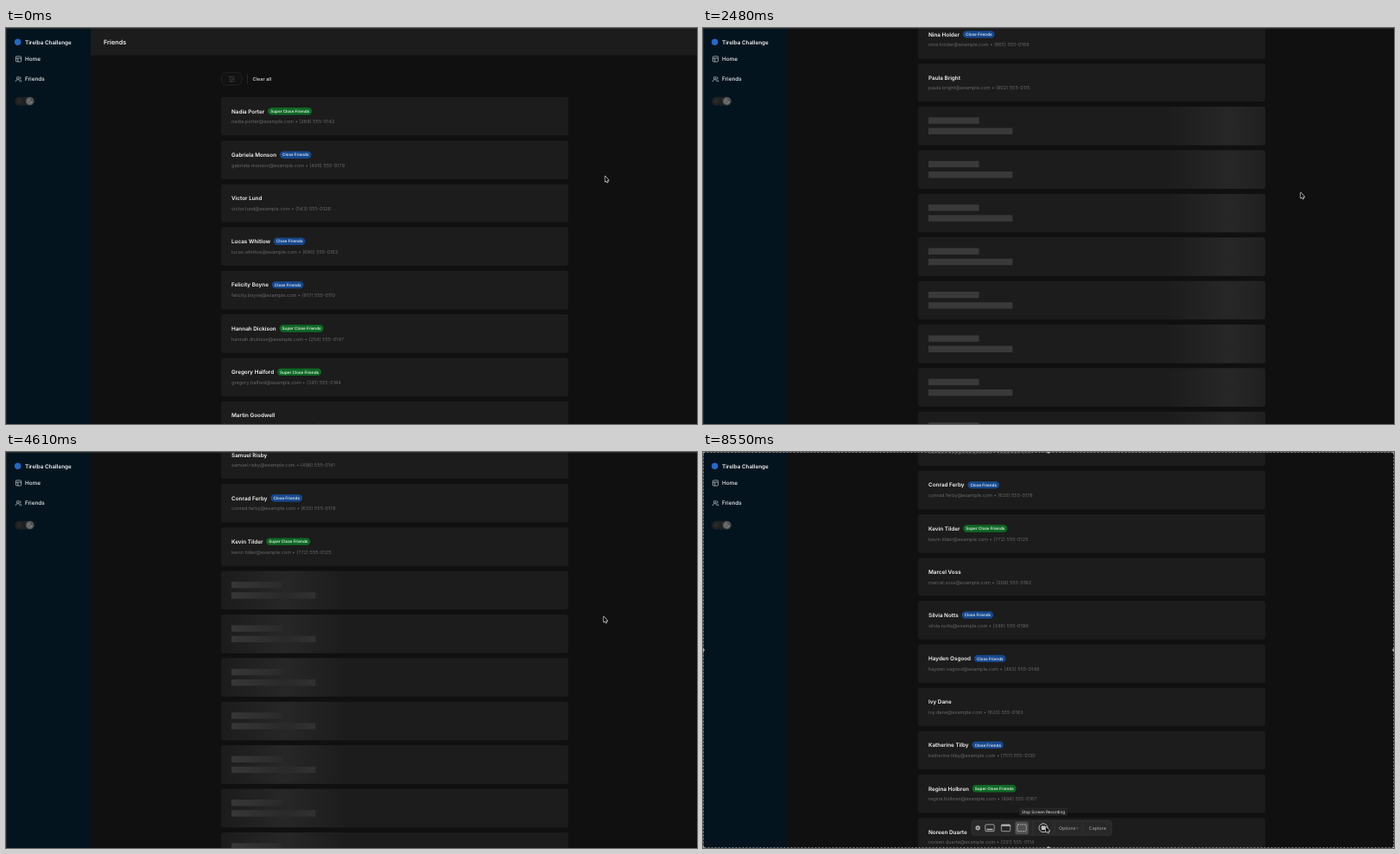
An HTML page with a canvas that plays this animation: 800x458 px, repeating every 8.58 s.

```html
<!DOCTYPE html>
<html lang="en">
<head>
<meta charset="utf-8">
<title>Friends</title>
<style>
  html, body { margin: 0; width: 100%; height: 100%; overflow: hidden; background: #101010; }
  canvas { display: block; width: 800px; height: 458px; }
</style>
</head>
<body>
<canvas id="stage"></canvas>
<script>
const W = 800, H = 458, LOOP = 8580;
const canvas = document.getElementById('stage');
const ctx = canvas.getContext('2d');
const ratio = window.devicePixelRatio || 1;
canvas.width = W * ratio;
canvas.height = H * ratio;

const CARD = { x: 249, w: 402, pad: 12, gap: 6, badged: 44.4, plain: 43.6 };
const LIST_TOP = 80;
const PAGE_LOADS = [0, 2850, 4950];
const SHIMMER_STARTS = [1080, 3925];
const TOOLBAR_IN = 6800, TOOLTIP_IN = 8340;
const BADGES = {
  s: { label: 'Super Close Friends', width: 51, fill: '#0f6825', ink: '#dcefdf' },
  c: { label: 'Close Friends', width: 36.6, fill: '#17488b', ink: '#d9e5f6' },
};

// One list per loaded page; the optional prefix is the badge kind.
const pages = [
  ['s:Nadia Porter', 'c:Gabriela Monson', 'Victor Lund', 'c:Lucas Whitlow', 'c:Felicity Boyne',
   's:Hannah Dickison', 's:Gregory Halford', 'Martin Goodwell', 'c:Nina Holder', 'Paula Bright'],
  ['c:Judith Norwood', 'Owen Tully', 's:Miriam Castle', 'c:Melanie Hampston', 'Colin Mercado',
   's:Curtis Haldren', 'c:Neil Tarvey', 'Samuel Risby', 'c:Conrad Ferby', 's:Kevin Tilder'],
  ['Marcel Voss', 'c:Silvia Notts', 'c:Hayden Osgood', 'Ivy Dane', 'c:Katherine Tilby',
   's:Regina Holbren', 'Noreen Duarte'],
];

// Layout: every friend gets a page position, every page a bottom edge.
const friends = [], pageEnds = [];
let nextTop = LIST_TOP;
pages.forEach((page, pageIndex) => {
  for (const entry of page) {
    const [name, kind] = entry.split(':').reverse();
    const i = friends.length;
    const height = kind ? CARD.badged : CARD.plain;
    const area = 200 + (i * 137 + 69) % 700;
    const line = 10 + (i * 37 + 32) % 90;
    const email = name.toLowerCase().replace(' ', '.') + '@example.com';
    friends.push({ name, badge: BADGES[kind], height, top: nextTop, page: pageIndex,
                   contact: `${email} • (${area}) 555-01${line}` });
    nextTop += height + CARD.gap;
  }
  pageEnds.push(nextTop);
});

// Keys are [time, value, slope].
const scrollKeys = [
  [900, 0, 0], [1420, 227.7, .4], [2480, 490.5, .01], [2850, 492, 0],
  [3420, 492, 0], [4060, 734.8, .45], [4610, 945.4, .08], [5100, 960.6, 0],
];

function hermite(keys, t) {
  if (t <= keys[0][0]) return keys[0][1];
  const next = keys.findIndex(k => k[0] > t);
  if (next < 0) return keys[keys.length - 1][1];
  const [t0, a, va] = keys[next - 1], [t1, b, vb] = keys[next];
  const d = t1 - t0, u = (t - t0) / d, u2 = u * u, u3 = u2 * u;
  return a * (2 * u3 - 3 * u2 + 1) + va * d * (u3 - 2 * u2 + u)
       + b * (3 * u2 - 2 * u3) + vb * d * (u3 - u2);
}

function ease(t, from, to) {
  const u = Math.min(1, Math.max(0, (t - from) / (to - from)));
  return u * u * (3 - 2 * u);
}

function cursorAt(t) {
  const settle = ease(t, 150, 850), reach = ease(t, 7390, 8330);
  const x = 693.5 - 1.5 * settle, y = 171.5 + 19 * settle;
  return [x + (397 - x) * reach, y + (433.5 - y) * reach];
}

function box(x, y, w, h, r, fill, stroke, lineWidth = .6) {
  ctx.beginPath();
  ctx.roundRect(x, y, w, h, r);
  if (fill) { ctx.fillStyle = fill; ctx.fill(); }
  if (stroke) { ctx.strokeStyle = stroke; ctx.lineWidth = lineWidth; ctx.stroke(); }
}

function disc(x, y, r, fill, stroke, lineWidth = .7) {
  box(x - r, y - r, 2 * r, 2 * r, r, fill, stroke, lineWidth);
}

function stroke(path, color, lineWidth = .7) {
  ctx.strokeStyle = color;
  ctx.lineWidth = lineWidth;
  ctx.stroke(new Path2D(path));
}

function text(str, x, baseline, size, weight, color, align = 'left') {
  ctx.font = `${weight} ${size}px Inter, sans-serif`;
  ctx.textAlign = align;
  ctx.fillStyle = color;
  ctx.fillText(str, x, baseline);
}

function drawHeader() {
  ctx.fillStyle = '#1c1c1c';
  ctx.fillRect(98, 0, W - 98, 31.5);
  text('Friends', 113, 19, 7.25, 600, '#f2f2f2');
  box(249.5, 51.6, 23.6, 14.4, 5, '#121212', '#2d2d2d');
  stroke('M258 56.4h7M258 59h7M258 61.6h7', '#4a4a4a');
  stroke('M259.6 55.5v1.8M263.2 58.1v1.8M260.6 60.7v1.8', '#4a4a4a');
  stroke('M279.4 53.5v11', '#3a3a3a');
  text('Clear all', 285.5, 61, 5.56, 600, '#c8c8c8');
}

function drawCard(top, height) {
  box(CARD.x + .3, top + .3, CARD.w - .6, height - .6, 2, '#1c1c1c', '#202020');
}

function drawFriend({ name, badge, height, contact }, top) {
  const x = CARD.x + CARD.pad, shift = badge ? 0 : -.4;
  drawCard(top, height);
  text(name, x, top + 18.6 + shift, 6.35, 600, '#f4f4f4');
  if (badge) {
    const left = x + ctx.measureText(name).width + 3.9;
    box(left, top + 12.1, badge.width, 8.4, 4.2, badge.fill);
    text(badge.label, left + badge.width / 2, top + 18, 4.63, 600, badge.ink, 'center');
  }
  text(contact, x, top + 30.3 + shift, 5.56, 400, '#676767');
}

function drawSkeleton(top, shimmerX) {
  const x = CARD.x + CARD.pad;
  drawCard(top, CARD.badged);
  ctx.fillStyle = '#393939';
  ctx.fillRect(x, top + 12.3, 58.6, 7.4);
  ctx.fillRect(x, top + 24.5, 97.4, 7.4);
  const glow = ctx.createLinearGradient(shimmerX - 72, 0, shimmerX + 72, 0);
  glow.addColorStop(0, 'rgba(40,40,40,0)');
  glow.addColorStop(.5, 'rgba(40,40,40,.9)');
  glow.addColorStop(1, 'rgba(40,40,40,0)');
  box(CARD.x, top, CARD.w, CARD.badged, 2, glow);
}

function drawList(t, scroll) {
  const loaded = PAGE_LOADS.filter(at => t >= at).length;
  const visible = top => top < H && top > -CARD.badged;
  for (const friend of friends) {
    const top = friend.top - scroll;
    if (friend.page < loaded && visible(top)) drawFriend(friend, top);
  }
  if (loaded === pages.length) return;
  const shimmerX = 48 + .4 * (t - SHIMMER_STARTS[loaded - 1]);
  for (let i = 0; i < 10; i++) {
    const top = pageEnds[loaded - 1] + i * (CARD.badged + CARD.gap) - scroll;
    if (visible(top)) drawSkeleton(top, shimmerX);
  }
}

function drawSidebar() {
  ctx.fillStyle = '#04141e';
  ctx.fillRect(0, 0, 98, H);
  disc(13.6, 16.2, 3.7, '#2468c8');
  text('Tirelba Challenge', 22, 18.5, 6.35, 600, '#f0f4f6');
  text('Home', 22, 38.1, 6.35, 500, '#f0f4f6');
  text('Friends', 22, 61.4, 6.35, 500, '#f0f4f6');

  box(11.4, 32.8, 6.2, 6.2, .9, null, '#c9d0d4', .7);
  stroke('M11.4 35h6.2M13.7 35v4', '#c9d0d4');

  disc(13.7, 57.8, 1.4, null, '#c9d0d4');
  stroke('M11.2 62.2c0-3.4 5-3.4 5 0M15.8 56.5c1.7.2 1.7 2.6 0 2.8M16.6 60c.9.4 1.3 1.2 1.3 2.2', '#c9d0d4');

  box(10.2, 79.8, 22.8, 9.8, 4.9, '#1d2123');
  disc(15.4, 84.7, 1.5, null, '#4a3c30', .6);
  ctx.setLineDash([.6, 1.4]);
  disc(15.4, 84.7, 2.8, null, '#4a3c30', .8);
  ctx.setLineDash([]);
  disc(27.6, 84.6, 4.9, '#505355');
  stroke('M27.4 82.1a2.7 2.7 0 1 0 2.9 3.2a2.2 2.2 0 0 1-2.9-3.2z', '#a5a5a5', .6);
}

function drawWindowEdge() {
  ctx.fillStyle = '#343637';
  ctx.fillRect(0, 0, W, .8);
  ctx.fillRect(0, 0, .7, H);
}

function drawRecorder(t) {
  const alpha = ease(t, TOOLBAR_IN, TOOLBAR_IN + 150);
  if (!alpha) return;
  ctx.globalAlpha = alpha;

  ctx.setLineDash([2, 2]);
  ctx.strokeStyle = '#8c8c8c';
  ctx.lineWidth = .9;
  ctx.strokeRect(.5, .5, W - 1, H - 1);
  ctx.setLineDash([]);
  for (const x of [0, W / 2, W])
    for (const y of [0, H / 2, H])
      if (x !== W / 2 || y !== H / 2) disc(x, y, 1.8, '#b4b4b4');

  box(311, 426.3, 162, 17, 3.2, '#282828', '#3d3d3d');
  disc(318.2, 434.7, 2.7, '#a8a8a8');
  stroke('M317.2 433.7l2 2M319.2 433.7l-2 2', '#2a2a2a', .6);

  const ink = '#b9b9b9';
  box(326.8, 430.9, 10.4, 7.8, 1, null, ink, .8);
  box(328.3, 435.8, 7.4, 1.5, .4, ink);
  box(345.4, 430.9, 10.4, 7.8, 1, null, ink, .8);
  box(345.4, 430.9, 10.4, 1.8, .6, ink);
  box(361.4, 427.4, 15.4, 14.8, 2, '#505050');
  ctx.setLineDash([1.4, 1]);
  box(363.9, 430.9, 10.4, 7.8, .8, null, '#e2e2e2', .8);
  ctx.setLineDash([]);

  stroke('M382 427v15.6M407 427v15.6M439.6 427v15.6', '#3d3d3d', .6);
  disc(394, 434.7, 5, null, '#c4c4c4', .9);
  box(391.8, 432.5, 4.4, 4.4, .7, '#c4c4c4');
  text('Options', 412, 436.7, 5.3, 400, '#a8a8a8');
  stroke('M432 434.4l1.2 1.2l1.2-1.2', '#a8a8a8', .6);
  text('Capture', 446.8, 436.7, 5.3, 400, '#a8a8a8');

  if (t >= TOOLTIP_IN) {
    box(366.8, 412.2, 54.4, 7.6, .8, '#222222', '#383838', .5);
    text('Stop Screen Recording', 394, 417.7, 4.6, 400, '#ededed', 'center');
  }
  ctx.globalAlpha = 1;
}

function drawCursor([x, y]) {
  const arrow = new Path2D('M0 0v6.2l1.4-1.2l.9 2.1l1.1-.5l-.9-2h1.9z');
  ctx.save();
  ctx.translate(x, y);
  ctx.lineJoin = 'round';
  ctx.lineWidth = 1.2;
  ctx.strokeStyle = '#dedede';
  ctx.stroke(arrow);
  ctx.fillStyle = '#0a0a0a';
  ctx.fill(arrow);
  ctx.restore();
}

function draw(t) {
  const scroll = hermite(scrollKeys, t);
  ctx.setTransform(ratio, 0, 0, ratio, 0, 0);
  ctx.textRendering = 'geometricPrecision';
  ctx.fillStyle = '#101010';
  ctx.fillRect(0, 0, W, H);
  ctx.save();
  ctx.translate(0, -scroll);
  drawHeader();
  ctx.restore();
  drawList(t, scroll);
  drawSidebar();
  drawWindowEdge();
  drawRecorder(t);
  drawCursor(cursorAt(t));
}

const start = performance.now();
function tick() {
  draw((performance.now() - start) % LOOP);
  requestAnimationFrame(tick);
}
tick();
</script>
</body>
</html>
```
